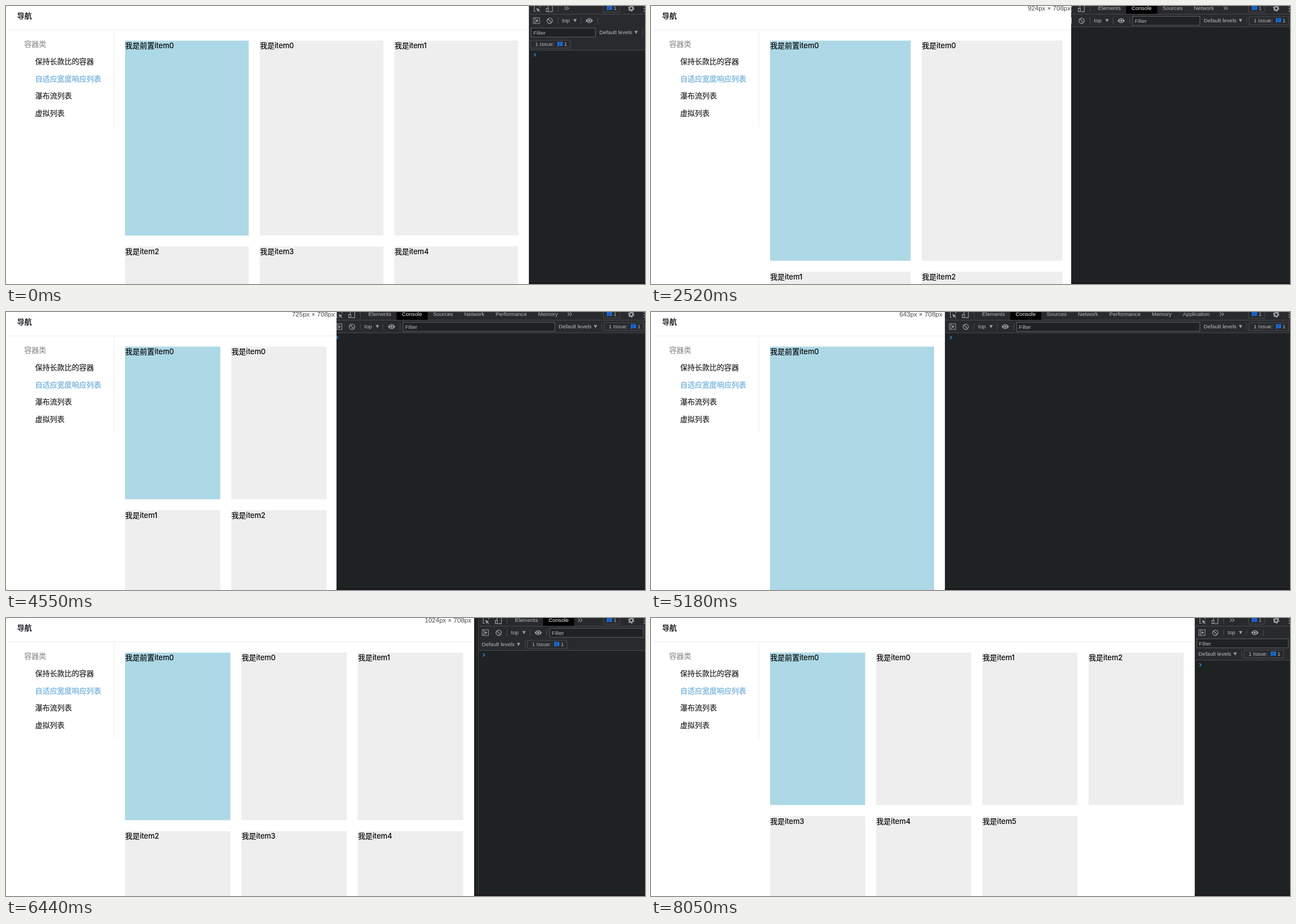
Write an HTML page with a canvas that moves like this. It is 1133 by 494 pixels and loops after 8960 ms.

```html
<!DOCTYPE html>
<html lang="zh-CN">
<head>
<meta charset="utf-8">
<title>Responsive list</title>
<style>
html, body { margin: 0; width: 100%; height: 100%; overflow: hidden; background: #fff; }
canvas { display: block; width: 1133px; height: 494px; }
</style>
</head>
<body>
<canvas id="stage"></canvas>
<script>
const W = 1133, H = 494, LOOP = 8960, STEP = 70;
const canvas = document.getElementById('stage');
const g = canvas.getContext('2d');
const ratio = window.devicePixelRatio || 1;
canvas.width = W * ratio;
canvas.height = H * ratio;

const PAGE_FONT = '13px Inter, "Noto Sans CJK SC", "Noto Sans CJK", sans-serif';
const UI_FONT = '9.7px "Liberation Sans", Arial, sans-serif';
const SIZE_FONT = '11.55px "Liberation Sans", Arial, sans-serif';
const BAR = '#292a2d', BODY = '#1f2223', RULE = '#494c50', ICON = '#9aa0a6', TEXT = '#b5b9be', BLUE = '#1a73e8';

// time, page width, panel offset from the page edge
const DRAG = [
  [0, 927.5, 0], [1680, 927.5, 0], [1750, 923.5, 0], [1890, 904, -11], [2170, 838, -20],
  [2520, 749, -22], [2800, 692, -11], [3080, 664, -4], [3290, 657.5, 0],
  [3710, 657.5, 0], [3780, 656.5, 0], [3920, 656.5, 0], [3990, 655, 0], [4060, 653.5, 0],
  [4130, 653.5, 0], [4200, 650, -4], [4410, 612, -13], [4760, 552, -8], [5040, 524, -1],
  [5180, 521.5, 0], [5460, 521.5, 0], [5530, 524, 3], [5740, 565, 14], [6090, 705, 20],
  [6440, 830, 7], [6720, 908, 9], [6930, 951, 5], [7070, 964, 0], [LOOP, 964, 0]
];

const TABS = [['Elements', 59.5], ['Console', 55], ['Sources', 55.5], ['Network', 55.5],
  ['Performance', 75.5], ['Memory', 55], ['Application', 68]];

function poseAt(t) {
  let i = 1;
  while (i < DRAG.length - 1 && DRAG[i][0] < t) i++;
  const a = DRAG[i - 1], b = DRAG[i];
  const k = (t - a[0]) / (b[0] - a[0]);
  const page = a[1] + (b[1] - a[1]) * k;
  return { page, panel: page + a[2] + (b[2] - a[2]) * k };
}

function fill(x, y, w, h, color) {
  g.fillStyle = color;
  g.fillRect(x, y, w, h);
}

function box(x, y, w, h, color) {
  g.strokeStyle = color;
  g.lineWidth = 1;
  g.strokeRect(x, y, w, h);
}

function text(str, x, y, font, color, align = 'left') {
  g.font = font;
  g.fillStyle = color;
  g.textAlign = align;
  g.fillText(str, x, y);
}

// Page text carries a hairline stroke for a slightly heavier weight.
function pageText(str, x, y, color, weight = 0.2) {
  text(str, x, y, PAGE_FONT, color);
  g.strokeStyle = color;
  g.lineWidth = weight;
  g.strokeText(str, x, y);
}

const ui = (str, x, y, color = TEXT) => text(str, x, y + 3.4, UI_FONT, color);

function path(d, x, y, color, width) {
  g.save();
  g.translate(x, y);
  const p = new Path2D(d);
  if (width) {
    g.strokeStyle = color;
    g.lineWidth = width;
    g.stroke(p);
  } else {
    g.fillStyle = color;
    g.fill(p);
  }
  g.restore();
}

const arrow = (x, y) => path('M-3-2.7H3L0 2.7Z', x, y, ICON);
const divider = (x, y) => fill(x - 0.5, y - 5.5, 1, 11, RULE);
const more = (x, y) => path('M-3.5-3L-.5 0L-3.5 3M.5-3L3.5 0L.5 3', x, y, ICON, 1.1);
const ring = r => `M${r} 0A${r} ${r} 0 1 1 ${-r} 0A${r} ${r} 0 1 1 ${r} 0`;

function chat(x, y) {
  path('M-4.5-4H4.5V3H-2.5L-4.5 5Z', x, y, BLUE);
  path('M-2.7-1.7H2.7M-2.7.8H1.2', x, y, '#16305c', 0.9);
}

function gear(x, y) {
  path(ring(3.2), x, y, ICON, 2.4);
  g.setLineDash([2.4, 2.42]);
  path(ring(4.6), x, y, ICON, 2);
  g.setLineDash([]);
}

function drawPage(width, showSize) {
  pageText('导航', 19.7, 22.3, '#1c1f23', 0.45);
  fill(4, 42, width - 8, 1, '#ececec');
  fill(191, 43, 1, 172, '#f0f0f0');
  pageText('容器类', 32.3, 72, '#909090');
  ['保持长款比的容器', '自适应宽度响应列表', '瀑布流列表', '虚拟列表'].forEach((name, i) =>
    pageText(name, 51.8, 102.8 + i * 30.8, i === 1 ? '#62a8d6' : '#222'));

  const left = 211, top = 61.5, gap = 19.5;
  const cols = Math.floor((width - left) / 181.6);
  const w = (width - left - gap * cols) / cols;
  const h = 1.49 * w + 19.4;
  for (let i = 0; i < 7; i++) {
    const x = left + (i % cols) * (w + gap);
    const y = top + Math.floor(i / cols) * (h + gap);
    fill(x, y, w, h, i ? '#eee' : '#add8e6');
    pageText(i ? '我是item' + (i - 1) : '我是前置item0', x + 0.3, y + 13.7, '#000');
  }
  if (showSize) {
    text(Math.round(width / 0.8107) + 'px × 708px', width - 5, 8, SIZE_FONT, '#4a4a4a', 'right');
  }
}

function drawTabs(x) {
  const limit = 1037, mid = 3.9;
  path('M-2 5H-4.8V-5H4.8V-2', x + 14, 4.5, ICON, 1.1);
  path('M-1.2-1L5.6 1.7L2.9 2.8L5.6 5.4L4.6 6.3L2 3.7L1 6Z', x + 14, 4.5, ICON);
  path('M-2.5-1.5V-6H5.3V5.3H-.5', x + 36, 4.8, ICON, 1.1);
  path('M-6-1H-1V5.8H-6ZM-5 .5V4.2H-2V.5Z', x + 36, 4.8, ICON);
  divider(x + 51.3, 5);

  // The active tab stays longest when space runs out.
  let left = x + 56;
  const bothFit = left + TABS[0][1] + TABS[1][1] <= limit;
  for (const [name, w] of bothFit ? TABS : [TABS[1]]) {
    if (left + w > limit) break;
    const active = name === 'Console';
    if (active) fill(left, 0, w, 14, '#000');
    ui(name, left + 9.6, mid, active ? '#f1f3f4' : TEXT);
    left += w;
  }
  more(left + 10.5, mid);

  box(1059.5, -3, 28.5, 14, RULE);
  chat(1070, 3.8);
  ui('1', 1077.3, mid);
  gear(1108.5, 4.3);
  for (const y of [0, 4.6, 9.2]) fill(1130.7, y - 0.8, 1.9, 1.9, ICON);
}

function drawFilter(x, right, y) {
  fill(x, y - 8, right - x, 16, BODY);
  box(x, y - 8, right - x, 16, '#5c6064');
  ui('Filter', x + 3.8, y + 0.5);
}

function drawLevels(x, y, sep) {
  ui('Default levels', x, y);
  arrow(x + 65.3, y);
  divider(sep, y);
}

function drawIssue(x, y) {
  box(x, y - 7, 70, 14, RULE);
  ui('1 Issue:', x + 8, y);
  chat(x + 52, y - 0.2);
  ui('1', x + 59.2, y);
}

// The console toolbar wraps like a flex row with a minimum filter width.
function toolbarLayout(x) {
  const inline = x + 127, wrapped = x + 3.7;
  const fits = (left, right) => right - left >= 100;
  if (fits(inline, 973)) {
    return { bottom: 37, filter: [inline, 973, 26.3], levels: [980, 26, 1056.3], issue: [1060.5, 26] };
  }
  if (fits(inline, 1045)) {
    return { bottom: 57.5, filter: [inline, 1045, 26.3], levels: [1052, 26, 1129], issue: [x + 2.7, 47] };
  }
  if (fits(inline, 1130)) {
    return { bottom: 57.5, filter: [inline, 1130, 26.3], levels: [x + 6.5, 47, x + 83.5], issue: [x + 87.5, 47] };
  }
  if (fits(wrapped, 1045)) {
    return { bottom: 78.5, filter: [wrapped, 1045, 47.2], levels: [1052, 47, 1129], issue: [x + 2.7, 68] };
  }
  return { bottom: 75, filter: [wrapped, 1130, 45], levels: [x + 6.5, 64, x + 83.5], issue: [x + 87.5, 64] };
}

function drawToolbar(x, layout) {
  const y = 26;
  box(x + 7.5, y - 5, 11, 10, ICON);
  path('M-2.5-5V5', x + 13, y, ICON, 1);
  path('M-.5-2.8L3.7 0L-.5 2.8Z', x + 13, y, ICON);
  path(ring(4.7) + 'M-3.3-3.3L3.3 3.3', x + 36.5, y + 0.3, ICON, 1.3);
  divider(x + 51.3, y);
  ui('top', x + 58.5, y);
  arrow(x + 81.5, y);
  divider(x + 92, y);
  path('M-6.5 0Q0-8.6 6.5 0Q0 8.6-6.5 0Z', x + 106.7, y, ICON);
  path(ring(2.5), x + 106.7, y, BAR, 1.1);
  divider(x + 121.7, y);
  drawFilter(...layout.filter);
  drawLevels(...layout.levels);
  drawIssue(...layout.issue);
}

function drawPanel(edge, x) {
  const layout = toolbarLayout(x), bottom = layout.bottom;
  g.save();
  g.beginPath();
  g.rect(edge, 0, W - edge, H);
  g.clip();
  fill(edge, 0, W - edge, H, BODY);
  fill(x, 0, W - x, bottom, BAR);
  drawTabs(x);
  fill(x, 14, W - x, 1, RULE);
  drawToolbar(x, layout);
  fill(x, bottom - 0.5, W - x, 1, RULE);
  path('M-1.7-2.8L1.4 0L-1.7 2.8', x + 10.3, bottom + 8.3, '#3b8cf0', 1.3);
  fill(Math.floor(x), 0, 1, H, '#3d4144');
  fill(edge, 491, W - edge, 3, '#1b1a1f');
  g.restore();
}

const start = performance.now();

function render() {
  const t = Math.floor((performance.now() - start) % LOOP / STEP) * STEP;
  const { page, panel } = poseAt(t);
  const edge = Math.floor(Math.min(page, page + 0.18 * (panel - page)));
  g.setTransform(ratio, 0, 0, ratio, 0, 0);
  fill(0, 0, W, H, '#fff');
  drawPage(page, t >= 1750 && t < 8050);
  drawPanel(edge, panel);
  requestAnimationFrame(render);
}
render();
</script>
</body>
</html>
```
